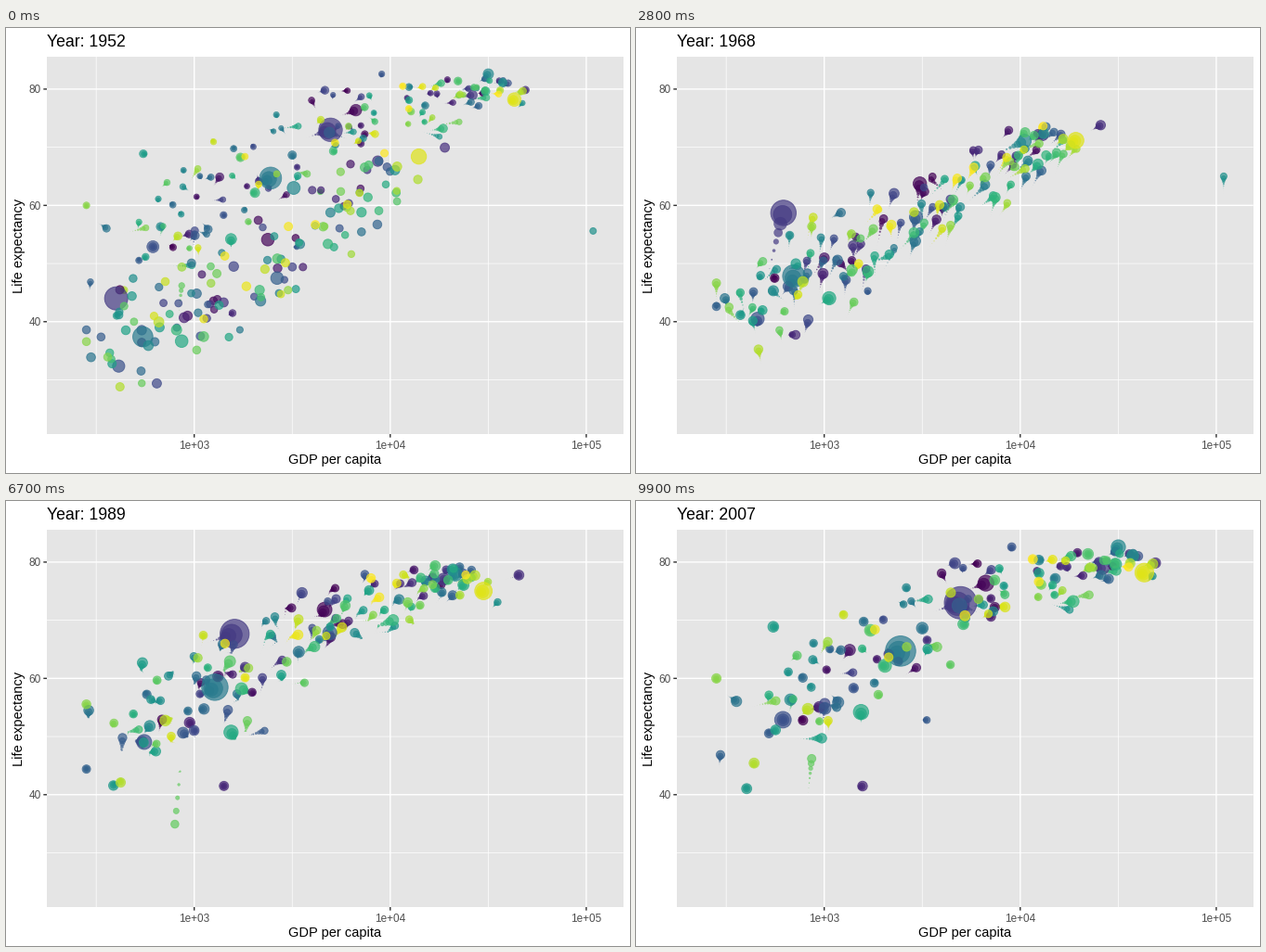
Animation of 672 by 480 pixels, one loop 10000 ms. Source, as a matplotlib script:

```python
import numpy as np
import matplotlib as mpl
import matplotlib.pyplot as plt
from matplotlib.animation import FuncAnimation
from matplotlib.patches import Rectangle

W, H, DPI = 672, 480, 96
FRAMES, STEPS, WAKE, COUNT = 100, 12, 10, 142
LEFT, RIGHT, TOP, BOTTOM = 44, 664.7, 31, 438
PX = 72 / DPI  # points per pixel

plt.rcParams["font.family"] = "Liberation Sans"
rng = np.random.default_rng(7)


def x_px(log_gdp):
    return 202.7 + 211.1 * (log_gdp - 3)


def y_px(life):
    return 65.9 + 6.272 * (80 - life)


# Each country has a fixed prosperity rank u; t runs from 0 to 1 over the loop
step = np.arange(STEPS)
t = step / (STEPS - 1)
u = (rng.permutation(COUNT)[:, None] + .5) / COUNT


def noise(scale):
    return scale * np.clip(rng.normal(size=(COUNT, 1)), -1.9, 1.9)


def mix(a, b, k):
    return a + (b - a) * k


# Income spreads out with time, with a random walk on top
walk = np.cumsum(rng.laplace(0, .028, (COUNT, STEPS)), axis=1)
log_gdp = mix(2.5 + 1.58 * u, 2.62 + 2.05 * u, t ** .85)
log_gdp = np.clip(log_gdp + noise(.13) + walk, 2.45, 4.69)

# Life expectancy rises fast at first; poor countries vary most
early = 36.5 + 32.5 * u ** 1.6 + noise(4.5) * (1.1 - .7 * u)
late = 48 + 32 * (1 - (1 - u) ** 2) + noise(6.5) * (1.1 - u)
wobble = rng.normal(0, .9, (COUNT, STEPS)) * (1.2 - u)
life = mix(early, late, 1 - (1 - t) ** 1.6) + wobble

pop = 10 ** np.clip(rng.normal(.8, .5, (COUNT, 1)), -.5, 1.9)
pop = pop * rng.uniform(1.3, 3.2, (COUNT, 1)) ** t


def steer(rank, first, last, *points):
    """Lead one bubble through (step, GDP per head, life expectancy)."""
    at, gdp, years = np.array(points, float).T
    log_gdp[rank] = np.interp(step, at, np.log10(gdp))
    life[rank] = np.interp(step, at, years)
    pop[rank] = first * (last / first) ** t


# The giants and the outliers that stand clear of the cloud
steer(24, 556, 1319, (0, 400, 44), (2, 488, 44.5), (3, 613, 58.4),
      (5, 741, 64), (11, 4959, 73))
steer(58, 372, 1110, (0, 547, 37.4), (5, 813, 54.2), (11, 2452, 64.7))
steer(134, 158, 301, (0, 13990, 68.4), (11, 42952, 78.2))
steer(66, 86, 127, (0, 3217, 63), (4, 14779, 73.4), (11, 31656, 82.6))
steer(71, .2, 2.5, (0, 108382, 55.6), (4, 109348, 67.7), (6, 31354, 71.3),
      (11, 47307, 77.6))
steer(107, 2.5, 8.9, (0, 493, 40), (7, 848, 44), (8, 737, 23.6),
      (11, 863, 46.2))

life = np.minimum(life, 82.6)
radius = 1.42 * (2 + 10 * np.sqrt(pop / pop.max())) + .47


def tween(states):
    at = np.linspace(0, STEPS - 1, FRAMES)
    return np.array([np.interp(at, step, row) for row in states]).T


track_x, track_y = tween(x_px(log_gdp)), tween(y_px(life))
track_r = tween(radius)

fig = plt.figure(figsize=(W / DPI, H / DPI), dpi=DPI, facecolor="white")
ax = fig.add_axes([0, 0, 1, 1])
ax.set_xlim(0, W)
ax.set_ylim(H, 0)
ax.axis("off")
ax.add_patch(Rectangle((LEFT, TOP), RIGHT - LEFT, BOTTOM - TOP,
                       fc="#E5E5E5", ec="none", zorder=0))


def line(xs, ys, width, color="white", z=1):
    ax.plot(xs, ys, color=color, lw=width * PX, zorder=z,
            solid_capstyle="butt", snap=False)


for x in (2.5, 3.5, 4.5):
    line([x_px(x)] * 2, [TOP, BOTTOM], .71)
for y in (30, 50, 70):
    line([LEFT, RIGHT], [y_px(y)] * 2, .71)
for x in (3, 4, 5):
    px = x_px(x)
    line([px, px], [TOP, BOTTOM], 1.42, z=2)
    line([px, px], [BOTTOM, BOTTOM + 3.67], 1.42, "#333333")
    ax.text(px, 453.5, f"1e+0{x}", size=8.8, color="#4D4D4D", ha="center")
for y in (40, 60, 80):
    py = y_px(y)
    line([LEFT, RIGHT], [py, py], 1.42, z=2)
    line([LEFT - 3.67, LEFT], [py, py], 1.42, "#333333")
    ax.text(38, py + 4.2, str(y), size=8.8, color="#4D4D4D", ha="right")

ax.text((LEFT + RIGHT) / 2, 470, "GDP per capita", size=11, ha="center")
ax.text(21, (TOP + BOTTOM) / 2, "Life expectancy", size=11, rotation=90,
        ha="right", va="center")
title = ax.text(LEFT, 20, "", size=13.2)

# Oldest echoes come first so that the present bubbles lie on top
ages = np.arange(WAKE - 1, -1, -1)
falloff = (1 - ages / WAKE) ** 3
colors = mpl.colormaps["viridis"](np.linspace(0, 1, COUNT))
colors[:, 3] = .7
colors = np.tile(colors, (WAKE, 1))
dots = ax.scatter(np.zeros(COUNT * WAKE), np.zeros(COUNT * WAKE),
                  c=colors, edgecolors=colors, zorder=3,
                  linewidths=np.repeat(falloff, COUNT) * .945 * PX)


def draw(i):
    past = (i - ages) % FRAMES
    r = track_r[past] * falloff[:, None]
    dots.set_offsets(np.c_[track_x[past].ravel(), track_y[past].ravel()])
    dots.set_sizes((2 * r.ravel() * PX) ** 2)
    title.set_text(f"Year: {1952 + 55 * i / (FRAMES - 1):.0f}")
    return dots, title


anim = FuncAnimation(fig, draw, frames=FRAMES, interval=100,
                     repeat=True, repeat_delay=0, blit=False)
plt.show()
```
